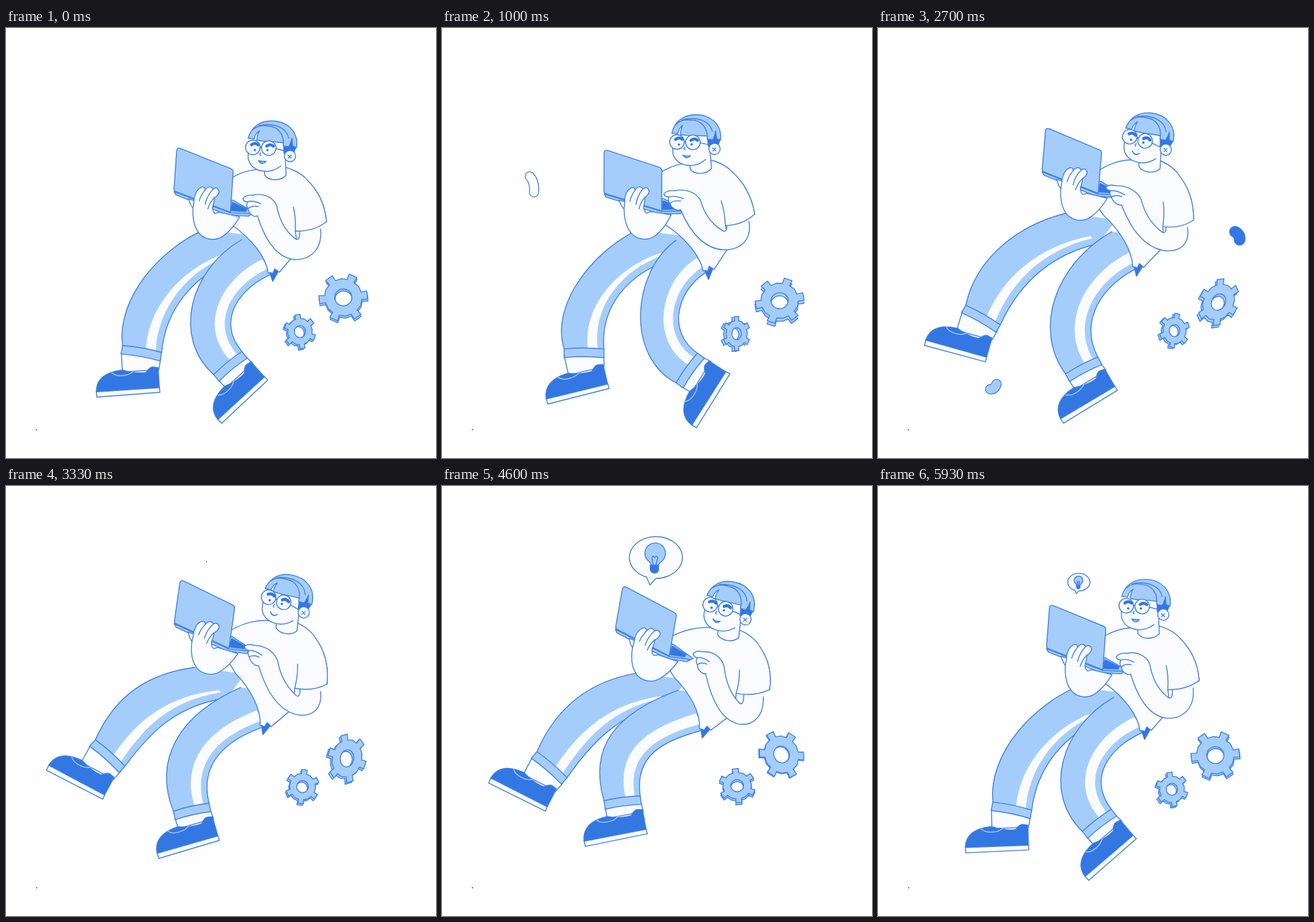
Animation of 648x648 px, one loop 6010 ms. Source, as an HTML page with a canvas:

```html
<!DOCTYPE html>
<html lang="en">
<head>
<meta charset="utf-8">
<style>
html, body { margin: 0; width: 100%; height: 100%; overflow: hidden; background: #fff }
canvas { display: block }
</style>
</head>
<body>
<canvas id="stage" width="648" height="648"></canvas>
<script>
const ctx = document.getElementById('stage').getContext('2d');
const LINE = '#3d7fe6', LIGHT = '#a5cdfb', DARK = '#3377e3', WHITE = '#fafcff';
const LOOP = 6010;
const { sin, cos, PI } = Math;

// The whole figure floats: each joint swings harmonically once per loop.
function rig(a) {
  const wave = (mean, c, s, s2 = 0, c2 = 0) =>
    mean + c * cos(a) + s * sin(a) + s2 * sin(2 * a) + c2 * cos(2 * a);
  const sleeve = [wave(481, 2, -12), wave(296, -1, -14)];
  const hem = [wave(395, 6, 1.5), wave(364.4, 4, -1.7)];
  const hip = [wave(292, 8, -1.5), wave(289.5, 14, 9)];
  return {
    neck: [wave(395.5, -5, -21), wave(217, 5.6, -7)],
    headTilt: wave(1, -3.5, -5.5),
    faceTilt: wave(4, -4, 0),
    smile: wave(.5, .5, 0),
    sleeve, hem, hip,
    elbow: [sleeve[0] - 48, sleeve[1] + wave(48, 6, 0)],
    armpit: [sleeve[0] - 9, sleeve[1] + 9],
    hand: [wave(365.5, 3, -23), wave(258, 7.7, -4.5)],
    lid: [wave(260.2, 0, -15.2), wave(163.2, 17.4, 13.7)],
    lidTilt: wave(1.3, -1.3, -5),
    crotch: [hip[0] + 48, hip[1] + 46],
    fold: [wave(354, 1, -2), wave(312, 7, 5)],
    thigh: [hem[0] + 5, hem[1]],
    backFoot: [wave(192, 40, 39, 7), wave(515, 31, 27.5, -11, 3), wave(13.5, -13, -19)],
    frontFoot: [wave(367.5, 27, 61), wave(531, -5.5, 3, -8, 5), wave(-28.6, -9.7, -23)],
    bigGear: [wave(511, -2.7, -1), wave(409, -3, 4)],
    bigTurn: wave(-6, 0, 7) - 60 * a / (2 * PI),
    bigSquash: wave(.12, -.1, 0),
    bigDepth: [wave(-1, 1.5, 0), wave(3, 0, 2)],
    smallGear: [wave(445, -2, 0), wave(456, 1.5, 4.5)],
    smallTurn: wave(30, -9, 5),
    smallSquash: wave(.08, 0, .15),
    smallDepth: [wave(-2, 0, -2), wave(2, 0, -1)]
  };
}
const rest = rig(0);

// Eased track of [time, value] pairs.
function track(points, t) {
  const i = points.findIndex(p => t < p[0]);
  if (i < 1) return points[i ? points.length - 1 : 0][1];
  const [t0, a] = points[i - 1], [t1, b] = points[i], u = (t - t0) / (t1 - t0);
  return a + (b - a) * u * u * (3 - 2 * u);
}

const place = ([x, y], deg, x0, y0) => new DOMMatrix().translate(x, y).rotate(deg).translate(-x0, -y0);

// Affine map that carries three resting joints to where they are now.
function skin(pose, ...names) {
  const basis = r => {
    const [p, q, s] = names.map(n => r[n]);
    return new DOMMatrix([q[0] - p[0], q[1] - p[1], s[0] - p[0], s[1] - p[1], ...p]);
  };
  return basis(pose).multiply(basis(rest).inverse());
}

function draw(d, fill, line = LINE, m = new DOMMatrix(), width = 1.4, rule = 'nonzero') {
  const path = new Path2D();
  path.addPath(new Path2D(d), m);
  if (fill) { ctx.fillStyle = fill; ctx.fill(path, rule); }
  if (line) { ctx.strokeStyle = line; ctx.lineWidth = width; ctx.stroke(path); }
}
const circle = (x, y, r) => `M${x + r},${y}a${r},${r} 0 1 1 ${-2 * r},0a${r},${r} 0 1 1 ${2 * r},0Z`;

// Leg edges are cubics, lists of four points from hip to cuff.
const forward = p => `M${p[0]}C${p.slice(1)}`;
const backward = p => `L${p[3]}C${[p[2], p[1], p[0]]}`;
const between = (a, b, hipU, cuffU) => a.map((p, i) => {
  const u = hipU + (cuffU - hipU) * i / 3;
  return [p[0] + (b[i][0] - p[0]) * u, p[1] + (b[i][1] - p[1]) * u];
});

function edge(shoe, hip, cuff, bend, shin) {
  const at = (x, y) => { const p = shoe.transformPoint({ x, y }); return [p.x, p.y]; };
  const end = at(...cuff);
  const knee = [hip[0] + bend[0] + .25 * (end[0] - hip[0]), hip[1] + bend[1] + .28 * (end[1] - hip[1])];
  return [hip, knee, at(cuff[0] + shin[0], cuff[1] + shin[1]), end];
}

function leg(shoe, a, b, corner, stripe) {
  const [lx, ly] = a[3], [rx, ry] = b[3], w = Math.hypot(rx - lx, ry - ly);
  const nx = (ly - ry) / w, ny = (rx - lx) / w, mx = (lx + rx) / 2, my = (ly + ry) / 2;
  const off = (x, y, k) => `${x + nx * k},${y + ny * k}`;
  const spot = (x, y) => { const p = shoe.transformPoint({ x, y }); return `${p.x},${p.y}`; };

  draw(`M${off(lx, ly, 10)}L${spot(176, 518)}L${spot(231, 514)}L${off(rx - nx, ry, 10)}Z`, WHITE);
  draw('M137,547L138,556L233,548L232,540Z', WHITE, LINE, shoe);
  draw('M137,548C137,529 150,518 176,515C188,519 204,520 212,518Q218,509 223,510L230,511L232,541Z', DARK, LINE, shoe);
  draw('M160,519C167,526 185,524 192,517', null, LIGHT, shoe);

  draw(forward(a) + backward(b) + `L${corner}Z`, LIGHT, null);
  draw(forward(between(a, b, ...stripe[0])) + backward(between(a, b, ...stripe[1])) + 'Z', WHITE, null);
  draw(forward(a) + forward(b), null);
  draw(`M${off(lx, ly, 0)}Q${off(mx, my, -3)} ${off(rx, ry, 0)}L${off(rx, ry, 13)}Q${off(mx, my, 10)} ${off(lx, ly, 13)}Z`, LIGHT);
}

function drawLegs(p) {
  const back = place(p.backFoot, p.backFoot[2] - 0, 233, 548);
  leg(back,
    edge(back, p.hip, [176, 478], [-35, -21], [-10, -72]),
    edge(back, p.crotch, [235, 488], [-40, -17], [5, -62]),
    [p.hip[0] + 75, p.hip[1] + 10], [[.75, .6], [.82, .85]]);
  const front = place(p.frontFoot, p.frontFoot[2], 233, 548);
  leg(front,
    edge(front, p.fold, [174, 491], [-68, -11], [-14, -83]),
    edge(front, p.thigh, [229, 490], [-42, -12], [-2, -61]),
    [p.fold[0] + 30, p.fold[1] + 3], [[.6, .6], [.85, .85]]);
}

// Flat gear squashed along `dir`, extruded by `depth`.
function gear([x, y], size, deg, dir, squash, [dx, dy]) {
  const pts = [];
  for (let i = 0; i < 6; i++)
    for (const [da, r] of [[-.2, .76], [-.17, 1], [.17, 1], [.2, .76], [.52, .78]]) {
      const a = deg * PI / 180 + i * PI / 3 + da;
      pts.push([cos(a) * r * size, sin(a) * r * size]);
    }
  const d = 'M' + pts.join('L') + 'Z' + circle(0, 0, size * .35);
  for (const k of [1, .5, 0]) {
    const m = new DOMMatrix().translate(x + dx * k, y + dy * k).rotate(dir).scale(1 - squash, 1).rotate(-dir);
    draw(d, LIGHT, k === .5 ? null : LINE, m, 1.4, 'evenodd');
  }
}

function bean(x, y, deg, length, width, color, scale) {
  if (scale <= 0) return;
  const m = new DOMMatrix().translate(x, y).rotate(deg).scale(scale);
  const d = `M-4,${-length}Q4,${-length / 3} 3,${length}`;
  draw(d, null, LINE, m, (width + 2.6) * scale);
  draw(d, null, color, m, width * scale);
}

function beans(t) {
  const pop = (from, to) => track([[from, 0], [from + 130, 1], [to - 180, 1], [to, 0]], t);
  const u = (t - 985) / 345, v = (t - 1800) / 900, w = (t - 2700) / 450;
  bean(136 - 28 * u * u, 236 - 8 * u, u * 25, 12, 12.5, '#fff', pop(510, 1490));
  bean(254 - 80 * v, 564 - 23 * v, 85 * v, 13 - 8 * v, 13, LIGHT, pop(1500, 2920));
  bean(542 - 38 * w, 313 + 6 * w, 25 * w, 6, 15, DARK, pop(2200, 2920));
}

function drawTorso(body) {
  draw('M397,368L413,362L402,382Z', DARK, LINE, body);
  draw('M310,250C335,222 365,212 389,213L421,210C450,217 478,245 483,292L436,306L440,335L428,349L412,368L405,363L402,370Q398,368 395,369C392,345 370,318 342,298L330,285Z', WHITE, LINE, body);
}

function drawHead(p) {
  const m = place(p.neck, p.headTilt - rest.headTilt, ...rest.neck);
  draw('M389,208L390,222C397,231 414,231 422,222L421,195', WHITE, LINE, m);
  draw('M365,165L364,196C370,217 396,222 414,208L422,196L420,165Z', WHITE, null, m);
  draw('M365,186L365,197C370,217 396,222 414,208', null, LINE, m);
  draw('M418,170L438,168L437,180L433,189H419Z', DARK, LINE, m);
  draw(circle(428, 193, 8.5), WHITE, LINE, m);
  draw('M425,191.5l5,4.5M430,191.5l-4.500,4.500', null, LINE, m);
  draw('M365,166C370,148 384,140 400,140C424,140 441,156 438,180L432,178L431,166Q429,175 426,179L418,178L418,173C405,171 392,172 378,169C378,164 379,160 382,155C377,158 375,163 374,167Z', LIGHT, LINE, m);
  draw('M371,154C381,145 390,147 397,148C410,149 418,160 418,173M381,147C404,142 423,150 426,166', null, LINE, m);

  const f = m.multiply(place([384, 180.5], p.faceTilt, 384, 180.5));
  draw('M407,182L420,185', null, LINE, f);
  draw(circle(372, 180, 11) + circle(396, 181, 11), WHITE, LINE, f);
  draw('M383,180Q384,178 385,180M384,188q-3,3 0,4', null, LINE, f);
  draw('M370,176Q375,172 380,176M393,178Q398,174 403,178', null, DARK, f, 4.5);
  draw(circle(375, 184, 1.8) + circle(394, 184, 1.8), DARK, null, f);
  draw(`M380.500,200Q386,208 392,201Q386,${207 - 6 * p.smile} 380.500,200Z`, LIGHT, LINE, f);
}

function drawLaptop(lap) {
  draw('M254,246L257,251L335,281L366,283L375,277L343,259Z', LIGHT, LINE, lap);
  draw('M342,262L364,272L362,276L339,275Z', DARK, LINE, lap);
  draw('M264,181L339,211Q344,213 343,218L339,277L257,246Q254,245 254,242L258,184Q259,179 264,181Z', LIGHT, LINE, lap);
  draw('M254,246L339,278L371,279', null, LINE, lap);

  draw('M276,257Q279,268 284,272L286,260Z', WHITE, LINE, lap);
  draw('M284,262C284,252 288,243 294,240Q300,237 301,243Q308,235 313,242Q320,238 322,246Q321,252 315,255L314,263C311,270 312,276 316,279L322,277L353,284C346,296 338,306 328,313C315,322 297,318 290,306C282,295 281,275 284,262Z', WHITE, LINE, lap);
  draw('M301,243Q294,252 292,260M313,242Q303,253 301,265M315,255Q308,262 305,272', null, LINE, lap);
}

function drawRightArm(arm, body) {
  draw('M474,303C477,330 462,349 436,349C408,347 390,318 379,283C374,286 366,280 365,273Q361,267 364,262Q358,262 357,257Q362,251 372,252C385,249 401,252 408,268C412,290 420,305 434,316C440,322 444,318 442,302', WHITE, LINE, arm);
  draw('M364,262Q372,259 384,265M365,272Q371,267 380,269', null, LINE, arm);
  draw('M433,270L436,306Q463,307 483,292C481,268 470,240 452,225', WHITE, null, body);
  draw('M433,270Q437,285 436,306Q463,307 483,292C481,268 472,246 452,227', null, LINE, body);
}

function drawBubble([x, y], t) {
  const s = track([[3330, 0], [3560, 1.3], [3760, 1], [5700, 1], [5855, 1.4], [5930, .42], [5970, 0]], t);
  if (s <= 0) return;
  const m = new DOMMatrix().translate(x + 37, y - 28).scale(s);
  draw('M-4,14A40,31.500 0 1 1 10,16L1,26Z', WHITE, LINE, m);
  draw('M3,-4Q3,-7 -3,-12A15.500,15.500 0 1 1 20,-11Q14,-6 14,-3Z', LIGHT, LINE, m);
  draw('M6,-4L4,-15Q5,-20 8,-15Q11,-20 13,-15L10,-4', null, LINE, m);
  draw('M1.500,-4H14V3Q13,8 7.500,8Q1.500,7 1.500,2Z', DARK, LINE, m);
}

function frame(now) {
  const t = now % LOOP, p = rig(2 * PI * t / LOOP);
  ctx.fillStyle = '#fff';
  ctx.fillRect(0, 0, 648, 648);
  ctx.lineCap = ctx.lineJoin = 'round';
  ctx.fillStyle = '#222';
  ctx.fillRect(45, 605, 2, 1);

  gear(p.bigGear, 37, p.bigTurn, 110 - 180 * t / LOOP, p.bigSquash, p.bigDepth);
  gear(p.smallGear, 26, p.smallTurn, 0, p.smallSquash, p.smallDepth);
  beans(t);

  const body = skin(p, 'neck', 'sleeve', 'hem');
  drawLegs(p);
  drawTorso(body);
  drawHead(p);
  drawLaptop(place(p.lid, p.lidTilt, 261, 180));
  drawRightArm(skin(p, 'hand', 'elbow', 'armpit'), body);
  drawBubble(p.lid, t);
  requestAnimationFrame(() => frame(performance.now() - start));
}
const start = performance.now();
frame(0);
</script>
</body>
</html>
```
